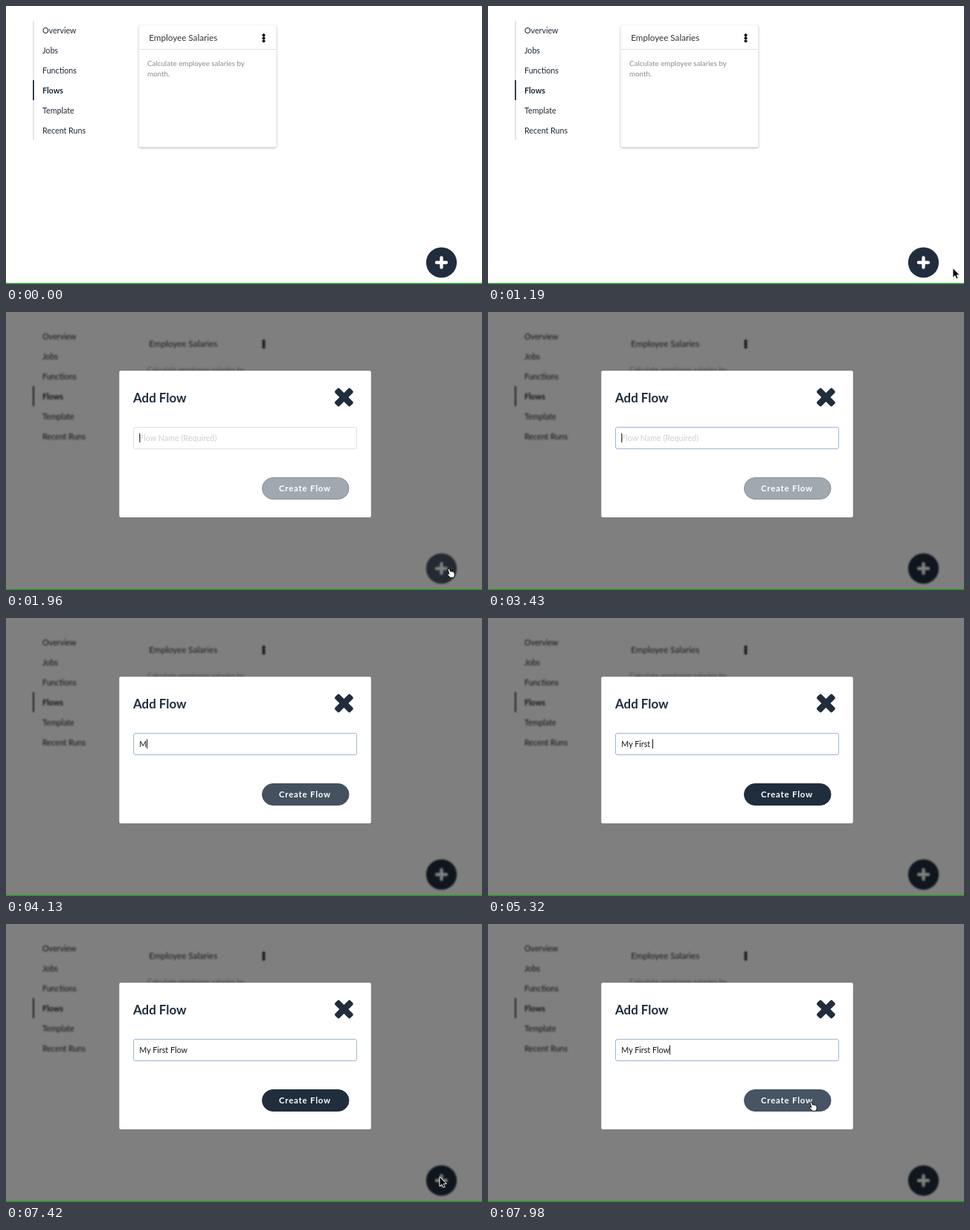
An HTML page for the animation above (8000 ms loop, 640 by 375 pixels).

```html
<!DOCTYPE html>
<html lang="en">
<head>
<meta charset="utf-8">
<title>Add Flow</title>
<style>
html, body { margin: 0; width: 100%; height: 100%; overflow: hidden; background: #fff; }
svg { display: block; width: 640px; height: 375px; font-family: Lato, sans-serif; }
text { white-space: pre; }
#page.dim { filter: blur(.85px); }
#page.dim .edge { visibility: hidden; }
#card { filter: drop-shadow(0 1px 1.5px rgba(40, 50, 85, .38)); }
.nav { font-size: 10.7px; fill: #1c2733; }
.bold { font-weight: 700; }
</style>
</head>
<body>
<svg viewBox="0 0 640 375">
  <defs>
    <path id="arrow" d="M0 0V13L3 10.2 5 14.6 7.2 13.6 5.3 9.4H9.4Z" fill="#000" stroke="#fff" stroke-width=".9"/>
    <path id="hand" d="M-1 .9Q0-.8 1.3.7L2.6 4.2Q3.6 3.3 4.5 4.3 5.7 3.5 6.4 4.8 7.8 4.5 8 6.2L8.2 9 7.2 12.2H2.1L-1.5 8.2Q-1.8 6.8-.3 7L.8 7.6Z" fill="#fff" stroke="#000" stroke-width=".9"/>
  </defs>
  <g id="page">
    <rect class="edge" x="36.4" y="20" width="1.2" height="161" fill="#d3d6d9"/>
    <rect x="36" y="100" width="1.7" height="27" fill="#1c2733"/>
    <g id="nav"></g>
    <rect id="card" class="edge" x="178.5" y="26" width="185" height="164.5" rx="3" fill="#fff"/>
    <rect class="edge" x="179" y="58" width="184" height="1" fill="#dfe1e4"/>
    <text x="192.2" y="47" font-size="11.7" fill="#333">Employee Salaries</text>
    <g fill="#111"><circle cx="346.5" cy="39.2" r="2"/><circle cx="346.5" cy="43.2" r="2"/><circle cx="346.5" cy="47.2" r="2"/></g>
    <g font-size="9.8" fill="#8c8c8c">
      <text x="190" y="80.5">Calculate employee salaries by</text>
      <text x="190" y="94.7">month.</text>
    </g>
    <circle id="add" cx="585.5" cy="346" r="20.6"/>
    <path d="M585.5 339.5V352.5M579 346H592" stroke="#fff" stroke-width="4.4" stroke-linecap="round"/>
  </g>
  <g id="modal">
    <rect width="640" height="375" fill="#000" opacity=".5"/>
    <rect x="152.3" y="79.3" width="338.5" height="197.7" rx="2" fill="#fff"/>
    <text class="bold" x="171" y="121.8" font-size="16.9" fill="#1f2d3d">Add Flow</text>
    <g transform="translate(454.4 115) rotate(45)" fill="#1f2d3d">
      <rect x="-14.5" y="-4.2" width="29" height="8.4" rx="2"/>
      <rect x="-4.2" y="-14.5" width="8.4" height="29" rx="2"/>
    </g>
    <rect id="field" x="171.5" y="155.5" width="300" height="29" rx="2.5" fill="#fff"/>
    <text id="value" x="179.3" y="173.6" font-size="10.75"></text>
    <rect id="caret" y="163.5" width="1" height="12.5" fill="#111"/>
    <rect id="create" x="344.5" y="223.5" width="116.5" height="29" rx="14.5"/>
    <text class="bold" x="367" y="242.2" font-size="11.4" letter-spacing=".8" fill="#fff">Create Flow</text>
  </g>
  <rect y="373.7" width="640" height="1.3" fill="#16a310"/>
  <use id="cursor"/>
</svg>
<script>
const $ = id => document.getElementById(id);
const LOOP = 8000, OPEN = 1960, HIDE = 2940, SHOW = 7350;
const NAVY = [31, 45, 61], HOVER = [70, 84, 100], DISABLED = [160, 168, 176];
const TEXT = "My First Flow";
// one press time per character of TEXT
const KEYS = [3990, 4200, 4340, 4620, 4830, 4970, 5110, 5250, 5320, 5670, 5880, 6160, 6440];

// pointer stops: time, x, y
const ENTER = [[980, 639, 357], [1540, 595, 346]];
const LEAVE = [[SHOW, 592, 345], [7420, 583, 341], [7910, 434, 240]];

$("nav").innerHTML = ["Overview", "Jobs", "Functions", "Flows", "Template", "Recent Runs"]
  .map((s, i) => `<text class="nav${s === "Flows" ? " bold" : ""}" x="49" y="${36.7 + 27 * i}">${s}</text>`).join("");

const ramp = (t, start, length) => Math.min(1, Math.max(0, (t - start) / length));
const mix = (a, b, p) => `rgb(${a.map((v, i) => Math.round(v + (b[i] - v) * p))})`;
const show = (el, on) => el.setAttribute("visibility", on ? "visible" : "hidden");

function along(stops, t) {
  let [, x, y] = stops[0];
  for (let i = 1; i < stops.length; i++) {
    const [t0, x0, y0] = stops[i - 1], [t1, x1, y1] = stops[i];
    if (t < t0) break;
    const p = ramp(t, t0, t1 - t0), e = p * p * (3 - 2 * p);
    x = x0 + (x1 - x0) * e;
    y = y0 + (y1 - y0) * e;
  }
  return [x, y];
}

function drawCursor(t) {
  const leaving = t >= SHOW;
  const [x, y] = along(leaving ? LEAVE : ENTER, t);
  const overLink = leaving ? x < 461 && y < 253 : x < 605;
  $("cursor").setAttribute("href", overLink ? "#hand" : "#arrow");
  $("cursor").setAttribute("transform", `translate(${x} ${y})`);
  show($("cursor"), t >= 980 && t < HIDE || leaving);
}

function drawForm(t) {
  const count = KEYS.filter(k => k <= t).length;
  const value = $("value");
  value.textContent = count ? TEXT.slice(0, count) : "Flow Name (Required)";
  value.setAttribute("fill", count ? "#151515" : "#cdcfd2");
  const width = count ? value.getComputedTextLength() : 0;
  $("caret").setAttribute("x", 179.3 + width);
  // the blink restarts on every key press
  const since = t - (count === KEYS.length ? 6500 : count ? KEYS[count - 1] : OPEN);
  show($("caret"), t >= OPEN && (since < 0 || since % 1000 < 500));
  $("field").setAttribute("stroke", mix([221, 224, 228], [158, 181, 214], ramp(t, OPEN, 200)));
  const fill = t < 7760 ? mix(DISABLED, NAVY, ramp(t, KEYS[0], 200)) : mix(NAVY, HOVER, ramp(t, 7760, 150));
  $("create").setAttribute("fill", fill);
  $("create").setAttribute("stroke", count ? fill : "#89929b");
}

function draw(t) {
  const open = t >= OPEN;
  $("page").classList.toggle("dim", open);
  const hover = ramp(t, 1260, 200) - ramp(t, OPEN, 250);
  $("add").setAttribute("fill", mix(NAVY, HOVER, hover));
  show($("modal"), open);
  drawForm(t);
  drawCursor(t);
}

const start = performance.now();
function tick() {
  draw((performance.now() - start) % LOOP);
  requestAnimationFrame(tick);
}
tick();
</script>
</body>
</html>
```
